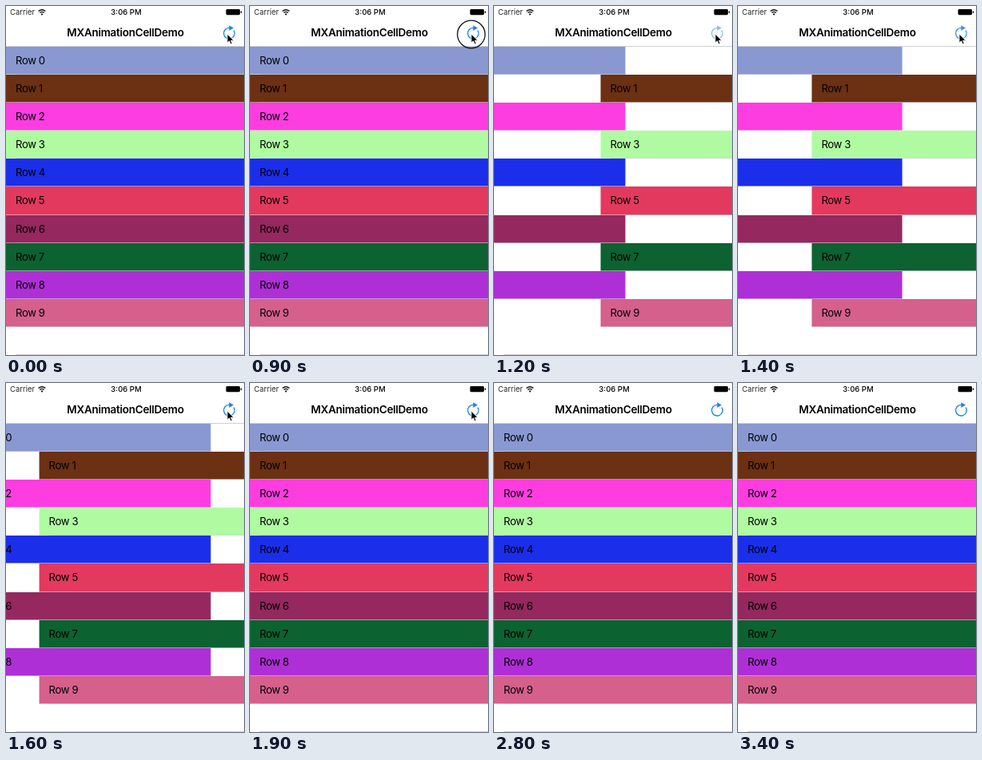
An HTML page for the animation above (3.5 s loop, 298 by 437 pixels).

```html
<!DOCTYPE html>
<html lang="en">
<head>
<meta charset="utf-8">
<title>MXAnimationCellDemo</title>
<style>
  html, body { margin: 0; width: 100%; height: 100%; overflow: hidden; background: #fff; }
  svg { display: block; width: 298px; height: 437px; }
  text { font-family: Inter, "Liberation Sans", sans-serif; fill: #000; }
  .row { font-size: 13.2px; letter-spacing: -.4px; }
  .title { font-size: 13.5px; font-weight: 600; letter-spacing: -.28px; }
  .status { font-size: 9.5px; }
</style>
</head>
<body>
<svg viewBox="0 0 298 437">
  <g id="rows"></g>
  <path d="M12 436.5H298" stroke="#d4d3d7"/>

  <rect width="298" height="50" fill="#fff"/>
  <path d="M0 50.5H298" stroke="#cfcfd2"/>
  <text class="status" x="5" y="11.3" fill-opacity=".85">Carrier</text>
  <g fill="none" stroke="#111" stroke-width="1.3">
    <path d="M40.6 6.6Q45 2.8 49.4 6.6M42.3 8.6Q45 6.2 47.7 8.6"/>
    <circle cx="45" cy="10.4" r=".5"/>
  </g>
  <text class="status" x="150.5" y="11.3" text-anchor="middle" font-weight="500">3:06 PM</text>
  <rect x="275.5" y="4" width="17.5" height="7.2" rx="1.4" fill="#000"/>
  <rect x="293.8" y="6.2" width="1.2" height="2.8" rx=".6" fill="#000"/>
  <text class="title" x="149.5" y="38" text-anchor="middle">MXAnimationCellDemo</text>

  <g id="icon">
    <path d="M285.2 30.6A6.8 6.8 0 1 1 279.5 27.4" fill="none" stroke="#1b82f5" stroke-width="1.4"/>
    <path d="M279.3 24.2L285 27.6L279.3 31Z" fill="#1b82f5"/>
  </g>
  <circle id="ring" cx="277" cy="35.5" fill="none" stroke="#111" stroke-width="1.3"/>
  <path id="cursor" d="M0 0V11.2L2.6 8.8L4.4 12.8L6.3 12L4.6 8.2H8.2Z"
        fill="#000" stroke="#fff" stroke-width=".9"/>
</svg>
<script>
const LOOP = 3500, STEP = 100;
const colors = ["#8998d1", "#6c3013", "#fd3de0", "#b0fba2", "#1b2eea",
                "#e4395f", "#94285f", "#0c6230", "#af2fd6", "#d5608c"];
const TOP = 50.9, PITCH = 35.1, SHIFT = 149;
const slide = { start: 980, length: 978, rest: 1900 };

// Values held from each time on
const iconFade = [[0, 1], [1000, .25], [1100, .38], [1200, .52], [1300, .7], [1400, .88], [1500, 1]];
const ringSize = [[0, 0], [800, 15], [900, 17.3], [1000, 0]];
const cursorPath = [[0, [277, 35]], [2300, [277, 43]], [2400, [279, 86]], [2500, [282, 165]],
                    [2600, [283, 266]], [2700, [281, 372]], [2800, [281, 460]]];

const $ = id => document.getElementById(id);
const held = (table, t) => table.filter(([at]) => at <= t).pop()[1];

function easeInOut(x) {
  const curve = (a, b, s) => 3 * a * s * (1 - s) ** 2 + 3 * b * s * s * (1 - s) + s ** 3;
  let lo = 0, hi = 1;
  for (let i = 0; i < 24; i++) {
    const mid = (lo + hi) / 2;
    if (curve(.42, .58, mid) < x) lo = mid; else hi = mid;
  }
  return curve(0, 1, lo);
}

$("rows").innerHTML = colors.map((color, i) => {
  const y = Math.round(TOP + i * PITCH);
  const end = Math.round(TOP + (i + 1) * PITCH);
  return `<g><rect y="${y}" width="298" height="${end - y}" fill="${color}"/>
    <path d="M0 ${end - .5}H12" stroke="#fff" stroke-opacity=".45"/>
    <path d="M12 ${end - .5}H298" stroke="#d0cfd4" stroke-opacity=".65"/>
    <text class="row" x="12" y="${y + 21.8}">Row ${i}</text></g>`;
}).join("");
const rows = [...$("rows").children];

function rowOffset(t) {
  if (t < slide.start || t >= slide.rest) return 0;
  return SHIFT * (1 - easeInOut((t - slide.start) / slide.length));
}

function draw(t) {
  const dx = rowOffset(t);
  rows.forEach((row, i) => row.setAttribute("transform", `translate(${i % 2 ? dx : -dx} 0)`));
  $("icon").setAttribute("opacity", held(iconFade, t));
  $("ring").setAttribute("r", held(ringSize, t));
  $("cursor").setAttribute("transform", `translate(${held(cursorPath, t)})`);
}

const begin = performance.now();
function tick() {
  const t = (performance.now() - begin) % LOOP;
  draw(Math.floor(t / STEP) * STEP);
  requestAnimationFrame(tick);
}
tick();
</script>
</body>
</html>
```
